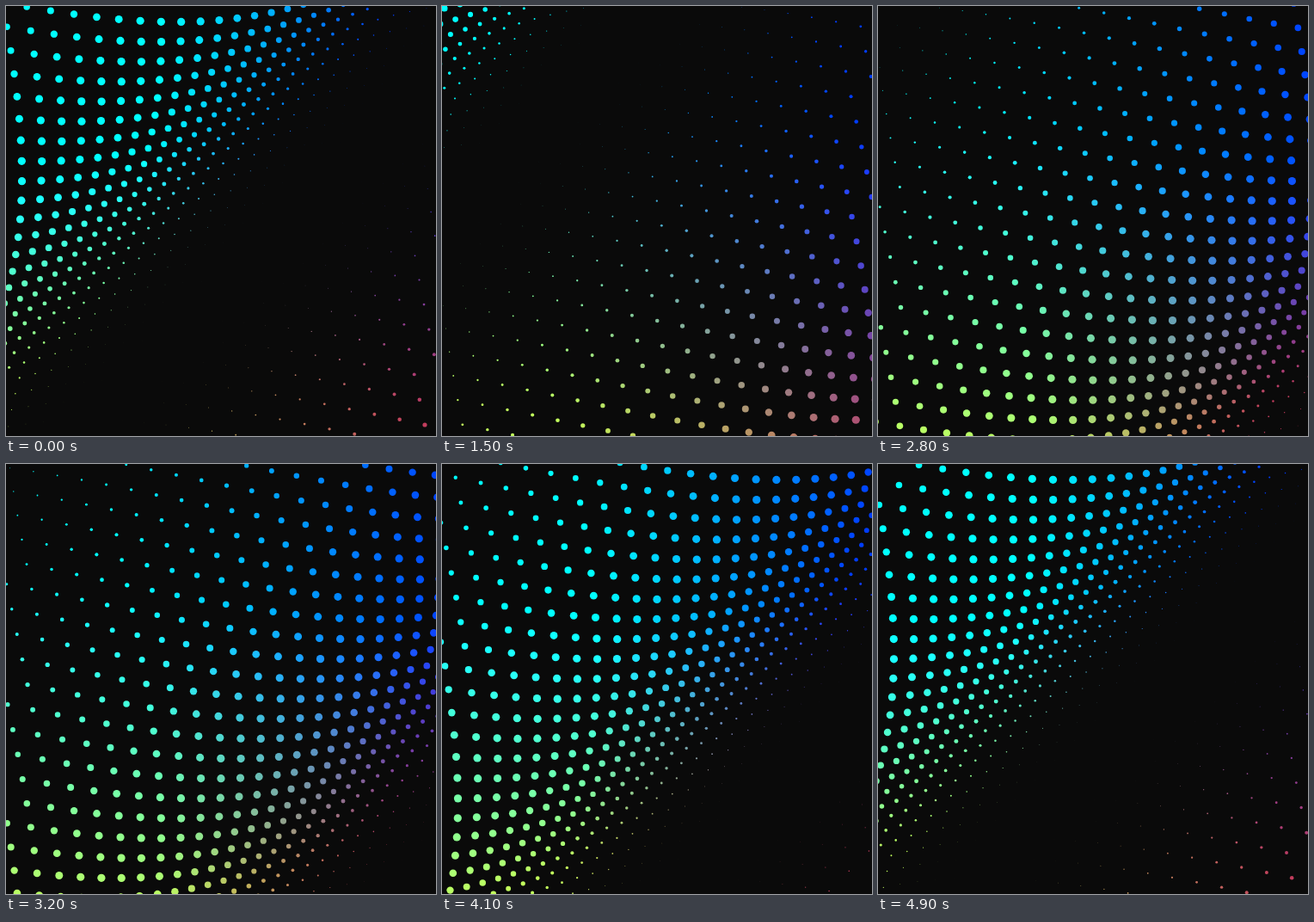
Write an HTML page with a canvas that moves like this. It is 500 by 500 pixels and loops after 5000 ms.

```html
<!DOCTYPE html>
<html lang="en">
<head>
<meta charset="utf-8">
<title>Dot wave</title>
<style>
  html, body { margin: 0; width: 100%; height: 100%; overflow: hidden; background: #0a0a0a; }
  canvas { display: block; }
</style>
</head>
<body>
<canvas id="stage" width="500" height="500"></canvas>
<script>
const ctx = document.getElementById('stage').getContext('2d');
const LOOP = 5000, STEP = 100;
const GAP = 25 / 1.08, MARGIN = 20 / 1.08, COUNT = 27;
const REACH = 50 / 1.08, RADIUS = 5 / 1.08;
const WAVE = 2 * Math.PI / 47.14;   // phase per diagonal grid step
const CREST = 7.75;                 // diagonal of the largest dots at time 0

const ramp = (v, start) => 0.57 * Math.max(0, Math.min(v, 520) - start);

function color(x, y) {
  return `rgb(${ramp(y, 180)}, ${255 - ramp(x, 180)}, ${255 - ramp(y, 235)})`;
}

function draw(time) {
  ctx.fillStyle = '#0a0a0a';
  ctx.fillRect(0, 0, 500, 500);
  const turn = 2 * Math.PI * time / LOOP;
  for (let i = 0; i < COUNT; i++) {
    for (let j = 0; j < COUNT; j++) {
      const x = MARGIN + i * GAP, y = MARGIN + j * GAP;
      const c = Math.cos(turn + WAVE * (i + j - CREST));
      const shift = REACH * (c - 1);
      ctx.fillStyle = color(x, y);
      ctx.beginPath();
      ctx.arc(x + shift, y + shift, RADIUS * (1 + c) / 2, 0, 2 * Math.PI);
      ctx.fill();
    }
  }
}

const start = performance.now();
function tick() {
  const t = (performance.now() - start) % LOOP;
  draw(Math.floor(t / STEP) * STEP);
  requestAnimationFrame(tick);
}
tick();
</script>
</body>
</html>
```
